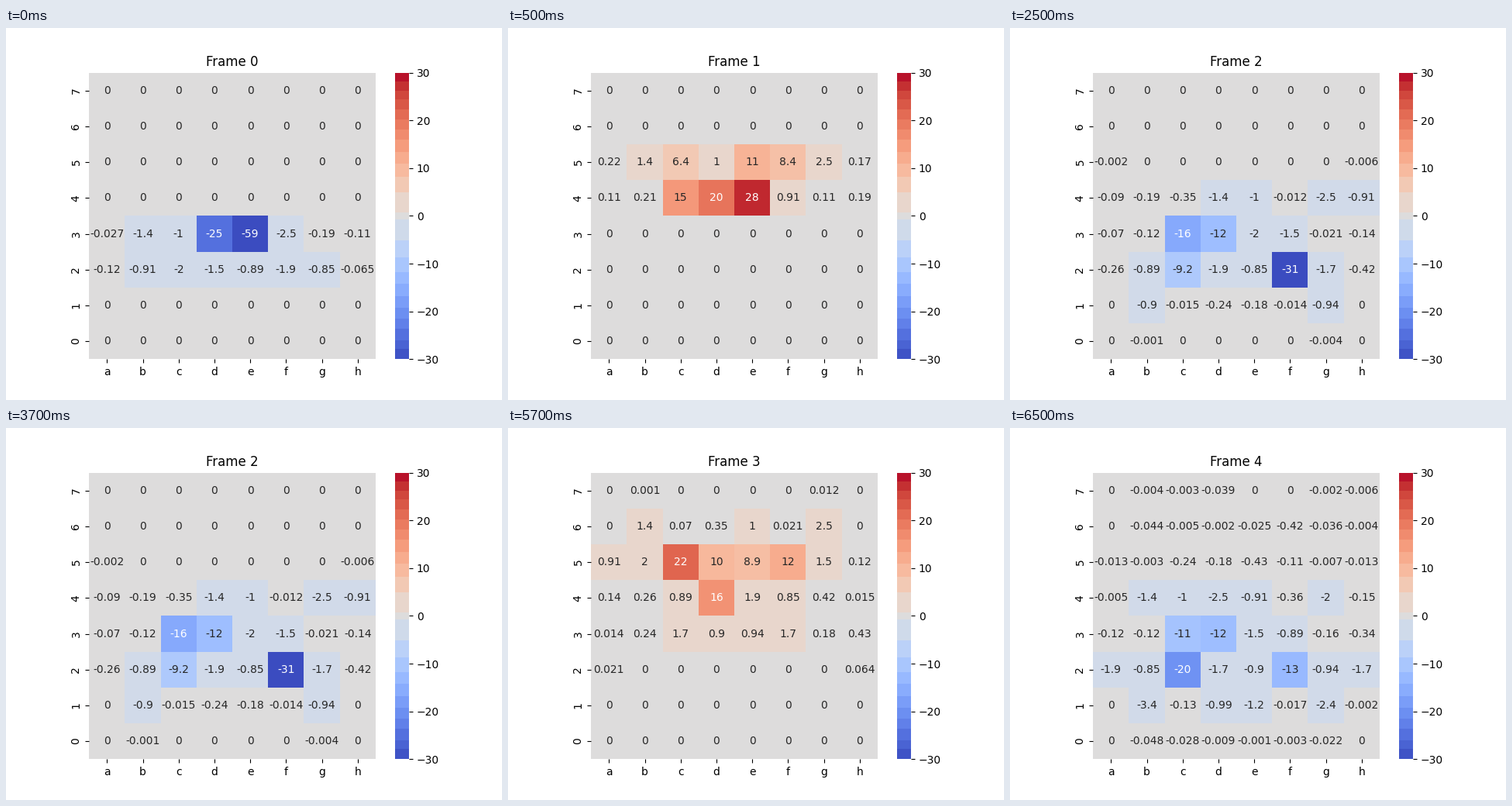
Write a matplotlib script that moves like this. It is 640 px wide and 480 px high and loops after 8000 ms.

```python
import random

import numpy as np
import matplotlib.pyplot as plt
from matplotlib.animation import FuncAnimation
from matplotlib.cm import ScalarMappable
from matplotlib.colors import ListedColormap, Normalize

LIMIT = 30
STEP_MS = 500
HOLD = 4  # steps each board stays; the loop starts at the last step of one
STEPS = 16
GRAY_BELOW, PALE_BELOW, PALE = 0.6, 6, 2.6

# Ranges of the weaker cells, strongest first.
RANGES = [(0.8, 4.6), (0.1, 0.45), (0.011, 0.095), (0.001, 0.009)]

# Per board: sign, peak cells, then the squares that fall in each range.
BOARDS = [
    (-1, dict(d3=25, e3=59),
     "bcf3 bcdefg2", "gh3 a2", "a3 h2"),
    (1, dict(c5=6.4, e5=11, f5=8.4, c4=15, d4=20, e4=28),
     "bdg5 f4", "ah5 abgh4"),
    (-1, dict(c3=16, d3=12, c2=9.2, f2=31),
     "degh4 ef3 bdeg2 bg1", "bc4 bh3 ah2 de1", "af4 ag3 cf1", "ah5 bg0"),
    (1, dict(c5=22, d5=10, e5=8.9, f5=12, d4=16),
     "beg6 abg5 cef4 cdef3", "d6 h5 abg4 bgh3", "g7 cf6 h4 a3 ah2", "b7"),
    (-1, dict(c3=11, d3=12, c2=20, f2=13),
     "bcdeg4 ef3 abdegh2 bdeg1", "f6 cdef5 fh4 abgh3 c1",
     "d7 beg6 ah5 f1 bcg0", "bcgh7 cdh6 bg5 a4 h1 def0"),
]

norm = Normalize(-LIMIT, LIMIT)
coolwarm = plt.get_cmap("coolwarm")


def cell(square):
    return int(square[1]), "abcdefgh".index(square[0])


def board_values(sign, peaks, *groups):
    rng = random.Random(7)
    values = np.zeros((8, 8))
    for square, size in peaks.items():
        values[cell(square)] = sign * size
    for (low, high), group in zip(RANGES, groups):
        for *files, rank in group.split():
            for file in files:
                size = low * (high / low) ** rng.random()
                values[cell(file + rank)] = sign * round(size, 3)
    return values


def cell_shades(values):
    size = np.abs(values)
    pale = np.where(size > GRAY_BELOW, PALE * np.sign(values), 0)
    return np.where(size > PALE_BELOW, values, pale)


def stepped_cmap():
    """Coolwarm in flat bands that get narrower towards both ends."""
    def side(count):
        return LIMIT * (np.arange(1, count + 1) / count) ** 0.73

    edges = np.concatenate([-side(11)[::-1], [-GRAY_BELOW, GRAY_BELOW], side(12)])
    levels = (np.arange(256) + 0.5) / 256 * 2 * LIMIT - LIMIT
    shades = (edges[:-1] + edges[1:]) / 2
    return ListedColormap(coolwarm(norm(shades[np.searchsorted(edges, levels) - 1])))


def label_color(value):
    rgb = np.array(coolwarm(float(norm(value)))[:3])
    linear = np.where(rgb <= 0.03928, rgb / 12.92, ((rgb + 0.055) / 1.055) ** 2.4)
    return ".15" if linear @ [0.2126, 0.7152, 0.0722] > 0.408 else "w"


boards = [board_values(*board) for board in BOARDS]

fig, ax = plt.subplots(figsize=(6.4, 4.8), dpi=100)
mesh = ax.pcolormesh(boards[0], cmap=coolwarm, norm=norm)
bar = fig.colorbar(ScalarMappable(norm, stepped_cmap()), ax=ax)
bar.outline.set_linewidth(0)
ax.set_aspect("equal")
ax.spines[:].set_visible(False)
centers = np.arange(8) + 0.5
ax.set_xticks(centers, list("abcdefgh"))
ax.set_yticks(centers, range(8), rotation="vertical", va="center")
title = ax.set_title("")
labels = [[ax.text(x, y, "", ha="center", va="center") for x in centers]
          for y in centers]


def draw(step):
    index = (step + HOLD - 1) // HOLD
    values = boards[index]
    mesh.set_array(cell_shades(values))
    title.set_text(f"Frame {index}")
    for (row, col), value in np.ndenumerate(values):
        labels[row][col].set(text=f"{value:.2g}", color=label_color(value))


anim = FuncAnimation(fig, draw, frames=STEPS, interval=STEP_MS,
                     repeat=True, repeat_delay=0)
plt.show()
```
